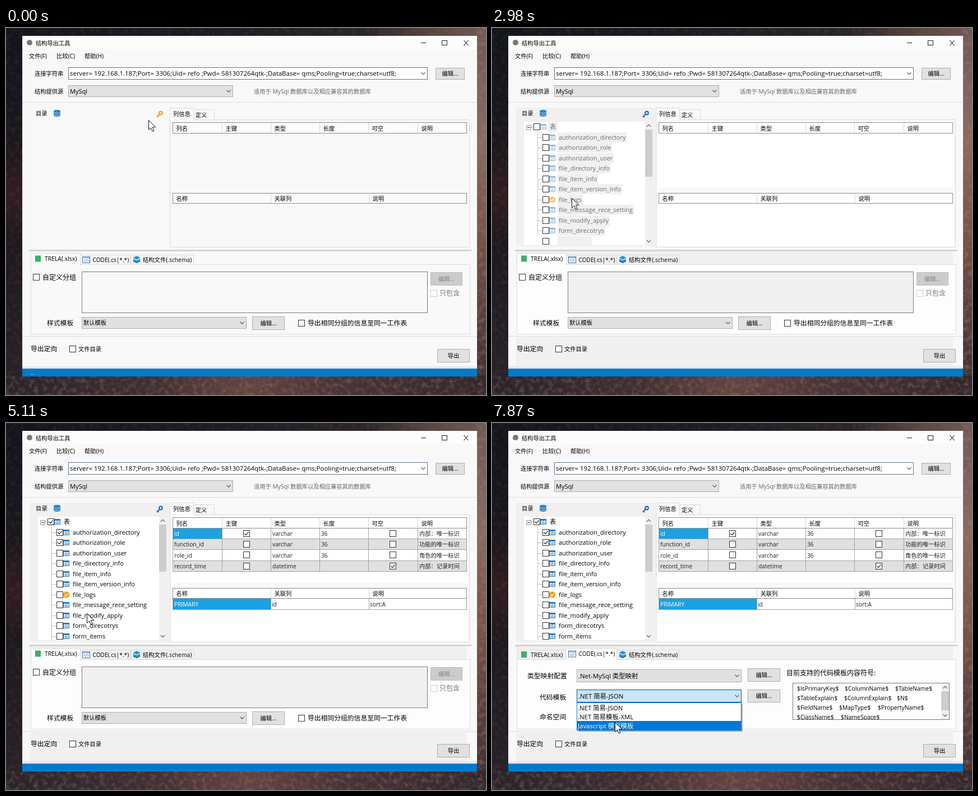
Write an HTML page that moves like this. It is 856 px wide and 654 px high and loops after 8000 ms.

```html
<!DOCTYPE html>
<html lang="zh-CN">
<head>
<meta charset="utf-8">
<title>结构导出工具</title>
<style>
html, body { margin: 0; width: 100%; height: 100%; overflow: hidden; background: #1b1a1f; }
svg { position: absolute; left: 0; top: 0; }
text { font-family: "Open Sans", "Noto Sans CJK SC", "Noto Sans CJK", sans-serif; white-space: pre; }
</style>
</head>
<body>
<svg width="856" height="654">
  <defs>
    <linearGradient id="top"><stop offset="0" stop-color="#12151b"/><stop offset=".5" stop-color="#1d1e25"/><stop offset=".75" stop-color="#2b2529"/><stop offset=".88" stop-color="#57443f"/><stop offset="1" stop-color="#705852"/></linearGradient>
    <linearGradient id="left" x2="0" y2="1"><stop offset="0" stop-color="#12151b"/><stop offset=".3" stop-color="#1a171d"/><stop offset=".45" stop-color="#2f1d20"/><stop offset=".6" stop-color="#1d191f"/><stop offset="1" stop-color="#29232a"/></linearGradient>
    <linearGradient id="right" x2="0" y2="1"><stop offset="0" stop-color="#705852"/><stop offset=".3" stop-color="#8a6a62"/><stop offset=".6" stop-color="#734f46"/><stop offset="1" stop-color="#3b2b2f"/></linearGradient>
    <linearGradient id="low"><stop offset="0" stop-color="#29232a"/><stop offset=".3" stop-color="#3f2f31"/><stop offset=".5" stop-color="#634441"/><stop offset=".7" stop-color="#483436"/><stop offset="1" stop-color="#33272b"/></linearGradient>
    <filter id="grain" x="0" y="0" width="1" height="1" color-interpolation-filters="sRGB">
      <feTurbulence type="fractalNoise" baseFrequency=".12" numOctaves="4" seed="7"/>
      <feColorMatrix values="0 0 0 0 .64  0 0 0 0 .5  0 0 0 0 .46  2.4 0 0 0 -1.05"/>
    </filter>
  </defs>
  <rect width="856" height="16" fill="url(#top)"/>
  <rect width="30" height="654" fill="url(#left)"/>
  <rect x="838" width="18" height="654" fill="url(#right)"/>
  <rect y="620" width="856" height="34" fill="url(#low)"/>
  <rect width="838" height="620" filter="url(#grain)" opacity=".12"/>
  <rect x="838" width="18" height="654" filter="url(#grain)" opacity=".5"/>
  <rect y="620" width="838" height="34" filter="url(#grain)" opacity=".4"/>
</svg>
<svg id="app" width="856" height="654"></svg>
<script>
const app = document.getElementById('app');
const pen = document.createElement('canvas').getContext('2d');
const BLUE = '#0078d7', SEL = '#1ba1e2', EDGE = '#adadad', FACE = '#e1e1e1', GREY = '#f0f0f0';

// Drawing helpers: boxes by corners, text by left edge and vertical middle.
const box = (x, y, r, b, fill = 'none', line) => line
  ? `<rect x="${x + .5}" y="${y + .5}" width="${r - x - 1}" height="${b - y - 1}" fill="${fill}" stroke="${line}"/>`
  : `<rect x="${x}" y="${y}" width="${r - x}" height="${b - y}" fill="${fill}"/>`;
const text = (x, y, s, size = 10.25, fill = '#000') =>
  `<text x="${x}" y="${y + size * .37}" font-size="${size}" fill="${fill}">${s}</text>`;
const path = (d, line, w = 1, fill = 'none', more = '') =>
  `<path d="${d}" stroke="${line}" stroke-width="${w}" fill="${fill}" ${more}/>`;
const hline = (x, r, y, c) => path(`M${x} ${y + .5}H${r}`, c);
const vline = (x, y, b, c) => path(`M${x + .5} ${y}V${b}`, c);
const measure = (s, size) => {
  pen.font = size + 'px "Open Sans","Noto Sans CJK SC","Noto Sans CJK",sans-serif';
  return pen.measureText(s).width;
};
const check = (x, y, on, c = '#333') => box(x, y, x + 12, y + 12, '#fff', c) +
  (on ? path(`M${x + 2.5} ${y + 6}l2.5 2.7 4.7-5.4`, '#222', 1.2) : '');
const chevron = (x, y, dir = 1, c = '#444') => path(`M${x - 3.5} ${y - 1.8 * dir}l3.5 ${3.6 * dir} 3.5 ${-3.6 * dir}`, c, 1.1);
const combo = (x, y, r, b, s, size, fill = FACE, line = EDGE) =>
  box(x, y, r, b, fill, line) + text(x + 3, (y + b) / 2, s, size) + chevron(r - 8, (y + b) / 2);
const button = (x, y, r, b, s, off) =>
  box(x, y, r, b, off ? '#ccc' : FACE, off ? '#bfbfbf' : EDGE) +
  text((x + r - measure(s, 10.3)) / 2, (y + b) / 2, s, 10.3, off ? '#838383' : '#000');
const scroller = (x, y, r, b, t1, t2) => box(x, y, r, b, GREY) + box(x, t1, r, t2, '#cdcdcd') +
  chevron((x + r) / 2, y + 7, -1) + chevron((x + r) / 2, b - 7);

const tables = ['authorization_directory', 'authorization_role', 'authorization_user', 'file_directory_info',
  'file_item_info', 'file_item_version_info', 'file_logs', 'file_message_rece_setting', 'file_modify_apply',
  'form_direcotrys', 'form_items'];
const heads = ['列名', '主键', '类型', '长度', '可空', '说明'];
const idRow = 'id|varchar|36||内部：唯一标识';
const grids = {
  logs: [idRow, 'log_type|varchar|16||记录的类型，例...', 'explain|varchar|1024|1|文件记录描述',
    'operator_name|varchar|255|1|操作人姓名', 'operator_id|varchar|36|1|操作人标识'],
  dir: [idRow, 'role_id|varchar|36||关联角色的标识', 'directory_id|varchar|36||关联目录的标识',
    'is_readable|tinyint|||是否可浏览目录...', 'is_addable|tinyint||1|是否可向目录中...'],
  role: [idRow, 'function_id|varchar|36||功能的唯一标识', 'role_id|varchar|36||角色的唯一标识',
    'record_time|datetime||1|内部：记录时间']
};
const maps = ["Javascript-MySql '类型映射'", '.Net-MySql 类型映射', '.Net-Tavelo 类型映射', '.Net-SqlTarvel 类型映射'];
const models = ['.NET 简易-JSON', '.NET 简易模板-XML', 'Javascript 模型模板'];
const roleTip = '授权-功能：记录对给个角色授权的功能信息';
const dirTip = '记录系统当前的文件目录信息';

// State changes by step; each one adds to the state before it.
const changes = {
  0: { status: '..', checked: 0, tick: -1, map: 0 },
  2: { tree: 'on', status: '结构信息加载完毕!' },
  7: { tip: [130, 230, 223, roleTip], patch: 1 },
  9: { tip: null },
  10: { tip: [143, 262, 154, dirTip] },
  11: { tree: 'off', rows: 4, tick: 3 },
  12: { tree: 'on', rows: 0, late: 1, patch: 0, status: '' },
  13: { tip: null },
  14: { tree: 'off', rows: 10, tick: 6 },
  15: { tree: 'on', rows: 0, grid: 'logs' },
  17: { tip: [92, 241, 223, roleTip] },
  18: { tip: null },
  19: { tree: 'off', rows: 10, checked: 1 },
  20: { tree: 'on', rows: 0, grid: 'dir' },
  21: { tree: 'off', rows: 10, checked: 2, tip: [97, 224, 223, roleTip] },
  22: { tree: 'on', rows: 0, grid: 'role' },
  23: { tip: null },
  25: { code: 1 },
  29: { open: 1, hover: 0 },
  31: { hover: 1 },
  34: { open: 0, map: 1 },
  36: { open: 2, hover: 2 }
};
// Pointer stops: step, x, y.
const stops = [[0, 254, 164], [2, 258, 168], [5, 225, 190], [7, 130, 211], [8, 130, 211], [10, 145, 242], [12, 145, 242],
  [14, 142, 303], [15, 142, 303], [17, 92, 207], [18, 93, 190], [19, 93, 190], [21, 97, 207], [22, 97, 207], [25, 168, 405],
  [27, 202, 446], [29, 240, 450], [31, 222, 484], [32, 221, 489], [33, 221, 489], [35, 235, 486], [36, 218, 541], [37, 219, 533]];

function pointer(n) {
  const i = Math.max(1, stops.findIndex(s => s[0] >= n));
  const [a, x, y] = stops[i - 1], [b, u, v] = stops[i], k = (n - a) / (b - a);
  const px = Math.round(x + (u - x) * k), py = Math.round(y + (v - y) * k);
  return path(`M${px + .5} ${py + .5}v17l4-3.7 2.7 6.3 2.8-1.2-2.7-6.2h5.6z`, '#111', 1, '#fff');
}

function frame(s) {
  return box(29, 14, 840, 621, '#f8f8f8') + box(29, 14, 840, 38, '#fcfcfc') +
    `<circle cx="42" cy="26" r="5" fill="#777"/>` + text(53, 27, '结构导出工具') +
    path('M740 26.5h9M816.5 22l8 9m0-9l-8 9', '#222', 1.1) + box(777, 22, 787, 31, 'none', '#222') +
    text(41, 50, '文件(F)') + text(90, 50, '比较(C)') + text(140, 50, '帮助(H)') +
    text(51, 81, '连接字符串') + text(51, 113, '结构提供源') +
    combo(111, 70, 752, 92, 'server= 192.168.1.187;Port= 3306;Uid= refo ;Pwd= 581307264qtk-;DataBase= qms;Pooling=true;charset=utf8;', 11.48, '#fff', '#5f7388') +
    button(766, 71, 818, 92, '编辑...') + combo(111, 102, 405, 123, 'MySql', 11) +
    text(442, 113, '适用于 MySql 数据库以及相应兼容其的数据库', 10.28, '#666') +
    hline(29, 840, 132, '#dcdcdc') +
    (s.late ? box(43, 398, 822, 422, GREY) + box(43, 551, 822, 604, GREY) : '') +
    box(41, 395, 830, 398, '#d4d4d4') + hline(29, 840, 549, '#dcdcdc') +
    text(44, 572, '导出定向', 11.8) + check(113, 566) + text(129, 572, '文件目录') +
    button(769, 572, 827, 596, '导出') +
    box(29, 603, 840, 607, '#e6e6e6') + box(29, 607, 840, 621, '#007acc') + text(44, 614, s.status, 10.25, '#fff');
}

function tableIcon(x, y, off) {
  return `<g opacity="${off ? .5 : 1}">` + box(x, y - 5, x + 11, y + 5, '#fff', '#2b79b9') + box(x, y - 5, x + 11, y - 2, '#2b79b9') +
    path(`M${x + 5.5} ${y - 2}v6M${x + 2} ${y + .5}h2.5m2.5 0h2.5M${x + 2} ${y + 2.5}h2.5m2.5 0h2.5`, '#2b79b9', .9) + '</g>';
}

function tree(s) {
  const key = s.tree ? '#2a6db5' : '#f0a020';
  let out = s.tree ? box(43, 142, 291, 168, GREY) + box(43, 168, 57, s.late ? 390 : 190, GREY) : '';
  if (s.late) out += box(57, 387, 291, 390, GREY) + box(285, 168, 291, 390, GREY);
  out += text(53, 152, '目录') +
    path('M85 148.5v7c0 3 12 3 12 0v-7z', 'none', 0, '#1d70b8') + `<ellipse cx="91" cy="148" rx="6" ry="2.3" fill="#2f86d0"/>` +
    path('M85 150c1 2.5 11 2.5 12 0M85 153.5c1 2.5 11 2.5 12 0', '#fff', .9) +
    `<circle cx="276" cy="151.5" r="2.8" fill="none" stroke="${key}" stroke-width="2.2"/>` +
    path('M273.8 153.8l-4.8 4.8m1.2-1.2l1.6 1.7', key, 2.2);
  if (!s.tree) return out;
  const off = s.tree == 'off', ink = off ? '#6d6d6d' : '#000', shown = off ? s.rows : 11;
  out += box(s.late ? 57 : 62, 167, 273, 387, '#fff') + scroller(273, 167, 286, 387, 181, 265);
  const dots = 'stroke-dasharray="1 1"', end = 185 + 18.5 * shown;
  out += path(`M81.5 183V${Math.min(end, 386)}`, '#888', 1, 'none', dots) +
    box(61, 173, 70, 182, '#fff', '#999') + hline(63, 68, 177, '#333') + path('M70 176.5h4', '#888', 1, 'none', dots) +
    check(74, 170, s.checked) + tableIcon(86, 176, off) +
    (off ? box(100, 167, 117, 185, GREY) : '') + text(103, 176, '表', 11, ink);
  out += '<svg width="273" height="387">';
  tables.forEach((name, i) => {
    const y = 194.6 + 18.5 * i, cy = Math.round(y);
    if (i > shown) return;
    out += check(90, cy - 6, i < s.checked);
    if (off && i == shown) { out += box(117, cy - 9, i == 4 ? 144 : 178, cy + 9, GREY); return; }
    out += path(`M82 ${cy + .5}h8`, '#888', 1, 'none', dots);
    if (off) out += box(117, cy - 9, 121 + measure(name, 11), cy + 9, GREY);
    out += i == s.tick
      ? `<g opacity="${off ? .6 : 1}"><circle cx="107.5" cy="${cy}" r="5.8" fill="#f0a41c"/>` + path(`M104.7 ${cy}l2.2 2.3 3.6-4.2`, '#fff', 1.4) + '</g>'
      : tableIcon(102, cy, off);
    out += text(119, y, name, 11, ink);
  });
  return out + '</svg>';
}

function grid(s) {
  const rows = grids[s.grid] || [], long = rows.length > 4, right = long ? 806 : 821, step = (right - 297.4) / 6;
  const xs = heads.map((_, i) => Math.round(297.4 + step * i)).concat(right);
  let out = box(292, 163, 827, 391, 'none', '#dcdcdc') + (s.late ? box(295, 165, 823, 389, '#fff') : '') +
    box(334, 145, 372, 164, '#f8f8f8', '#dcdcdc') + box(292, 142, 335, 165, '#fbfbfb', '#dcdcdc') + box(293, 163, 334, 166, '#fbfbfb') +
    text(298, 153, '列信息') + text(338, 155, '定义');
  if (s.late) out += box(297, 285, 821, 294, '#f8f8f8');
  if (s.patch) out += box(298, 188, 354, 285, '#fff');
  const line = '#a0a0a0', head = '#8c8c8c';
  rows.forEach((row, r) => {
    const [name, type, size, empty, note] = row.split('|');
    const y = Math.round(187.5 + 19.4 * r), b = Math.round(187.5 + 19.4 * (r + 1)), m = (y + b) / 2;
    out += box(297, y, right, b, r % 2 ? '#e0e0e0' : '#fff') + hline(297, right, b - 1, line);
    xs.forEach(x => out += vline(x, y, b, line));
    if (!r) out += box(298, y, xs[1], b - 1, SEL);
    const mid = i => Math.round((xs[i] + xs[i + 1]) / 2) - 6;
    out += text(300, m, name, 10.25, r ? '#222' : '#fff') + check(mid(1), Math.round(m) - 7, !r) + text(xs[2] + 3, m, type, 10.25, '#222') +
      text(xs[3] + 3, m, size, 10.25, '#222') + check(mid(4), Math.round(m) - 7, empty) + text(xs[5] + 3, m, note, 10.25, '#222');
  });
  out += box(297, 168, right + 1, 188, s.late ? '#fff' : '#fbfbfb', head);
  heads.forEach((h, i) => out += (i ? vline(xs[i], 169, 187, '#d8d8d8') : '') + text(xs[i] + 6.5, 179, h));
  if (long) out += scroller(808, 168, 821, 285, 183, 238);
  if (rows.length) out += box(297, 312, 822, 333, '#fff', line) + box(298, 313, 472, 332, SEL) +
    vline(472, 313, 332, line) + vline(647, 313, 332, line) +
    text(300, 323, 'PRIMARY', 10.25, '#fff') + text(474, 323, 'id', 10.25, '#222') + text(649, 323, 'sort:A', 10.25, '#222');
  out += box(297, 294, 822, 313, s.late ? '#fff' : '#fbfbfb', head);
  ['名称', '关联列', '说明'].forEach((h, i) => {
    const x = 297 + 175 * i;
    out += (i ? vline(x, 295, 312, '#d8d8d8') : '') + text(x + 6.5, 304, h);
  });
  return out;
}

function tabs(s) {
  const pane = s.late ? '#fdfdfd' : '#f9f9f9', rim = '#dcdcdc', c = s.code;
  const tab = (x, r, on) => box(x, on ? 401 : 404, r, 423, on ? pane : s.late ? GREY : '#f6f6f6', rim);
  const y = on => on ? 411.5 : 413;
  return tab(222, 335) + (c ? tab(46, 132) : tab(132, 222)) + box(44, 421, 828, 546, pane, rim) +
    (c ? tab(131, 223, 1) + box(132, 421, 222, 424, pane) : tab(44, 133, 1) + box(45, 421, 132, 424, pane)) +
    box(52, y(!c) - 6, 62, y(!c) + 5, '#3fae6c') + text(69, y(!c), 'TRELA(.xlsx)', 10.4) +
    box(136, y(c) - 6, 150, y(c) + 6, '#fff', '#3f6fae') + hline(136, 150, y(c) - 4, '#3f6fae') +
    path(`M141 ${y(c) - 1}l-2 2.2 2 2.2m4-4.4l2 2.2-2 2.2m-1.3-4.6l-1.5 5`, '#3f6fae', .9) + text(154.5, y(c), 'CODE(.cs|*.*)', 10.1) +
    path('M227 415l6 3.2 6-3.2', '#0f6ea8', 2) + path('M227 412.3l6 3.2 6-3.2', '#1787c4', 2) + path('M226.5 409.3l6.5-3.3 6.5 3.3-6.5 3.4z', 'none', 0, '#1b97d5') +
    text(244, 413, '结构文件(.schema)', 10.3);
}

function sheetPane(s) {
  return check(48, 438) + text(65, 444.5, '自定义分组', 12) + box(135, 434, 752, 508, s.late ? GREY : '#f8f8f8', '#7c7c7c') +
    button(757, 435, 814, 459, '编辑...', true) + check(757, 467, 0, '#ccc') + text(773, 473, '只包含', 12, '#777') +
    text(73, 526, '样式模板', 11.8) + combo(135, 515, 429, 536, '默认模板', 10.25) + button(439, 514, 497, 538, '编辑...') +
    check(521, 520) + text(538, 526, '导出相同分组的信息至同一工作表', 11.8);
}

function dropdown(y, items, hover) {
  const b = y + 16 * items.length + 2;
  return box(154, y + 2, 447, b + 2, 'rgba(0,0,0,.3)') + box(151, y, 445, b, '#fff', BLUE) + items.map((s, i) => {
    const t = y + 1 + 16 * i, on = i == hover;
    return (on ? box(152, t, 444, t + 16, BLUE) : '') + text(153, t + 8.3, s, 11.4, on ? '#fff' : '#000');
  }).join('');
}

function codePane(s) {
  const field = (y, v, n) => combo(151, y, 445, y + 23, v, 11.4, s.open == n ? '#cce4f7' : FACE, s.open == n ? '#005499' : EDGE);
  const marks = ['IsPrimaryKey 544 ColumnName 629 TableName 719', 'TableExplain 544 ColumnExplain 628 N 722',
    'FieldName 544 MapType 619 PropertyName 688', 'ClassName 544 NameSpace 622'];
  let out = text(63, 450.5, '类型映射配置', 11.8) + text(85, 488.5, '代码模板', 11.8) + text(85, 523.5, '命名空间', 11.8) +
    field(439, maps[s.map], 1) + field(475, models[0], 2) +
    box(151, 512, 445, 533, '#fff', '#7a7a7a') + text(154, 522.5, 'Degage.DataModel', 11.2) +
    button(456, 437, 514, 461, '编辑...') + button(456, 475, 514, 498, '编辑...') +
    text(525, 445.5, '目前支持的代码模板内容符号:', 12) + box(536, 463, 816, 529, '#fff', '#7a7a7a') +
    scroller(801, 464, 815, 528, 478, 512) + '<svg width="800" height="528">';
  marks.forEach((row, i) => row.replace(/(\w+) (\d+)/g, (_, w, x) => { out += text(+x, 473.5 + 16.9 * i, `$${w}$`, 10.35); }));
  out += '</svg>';
  if (s.open == 1) out += dropdown(462, maps, s.hover);
  if (s.open == 2) out += dropdown(498, models, s.hover);
  return out;
}

const tip = ([x, y, w, s]) => box(x + 3, y + 3, x + w + 3, y + 23, 'rgba(0,0,0,.35)') +
  box(x, y, x + w, y + 20, '#fff', '#767676') + text(x + 4.5, y + 10, s, 11.05, '#575757');

function draw(n) {
  const s = {};
  for (let i = 0; i <= n; i++) Object.assign(s, changes[i]);
  app.innerHTML = frame(s) + tree(s) + grid(s) + tabs(s) + (s.code ? codePane(s) : sheetPane(s)) +
    (s.tip ? tip(s.tip) : '') + pointer(n);
}

const start = performance.now(), LOOP = 8000, STEP = 212.7;
let last = -1;
function tick() {
  const t = (performance.now() - start) % LOOP;
  const n = Math.min(37, Math.floor((t + 7) / STEP));
  if (n != last) draw(last = n);
  requestAnimationFrame(tick);
}
tick();
</script>
</body>
</html>
```
